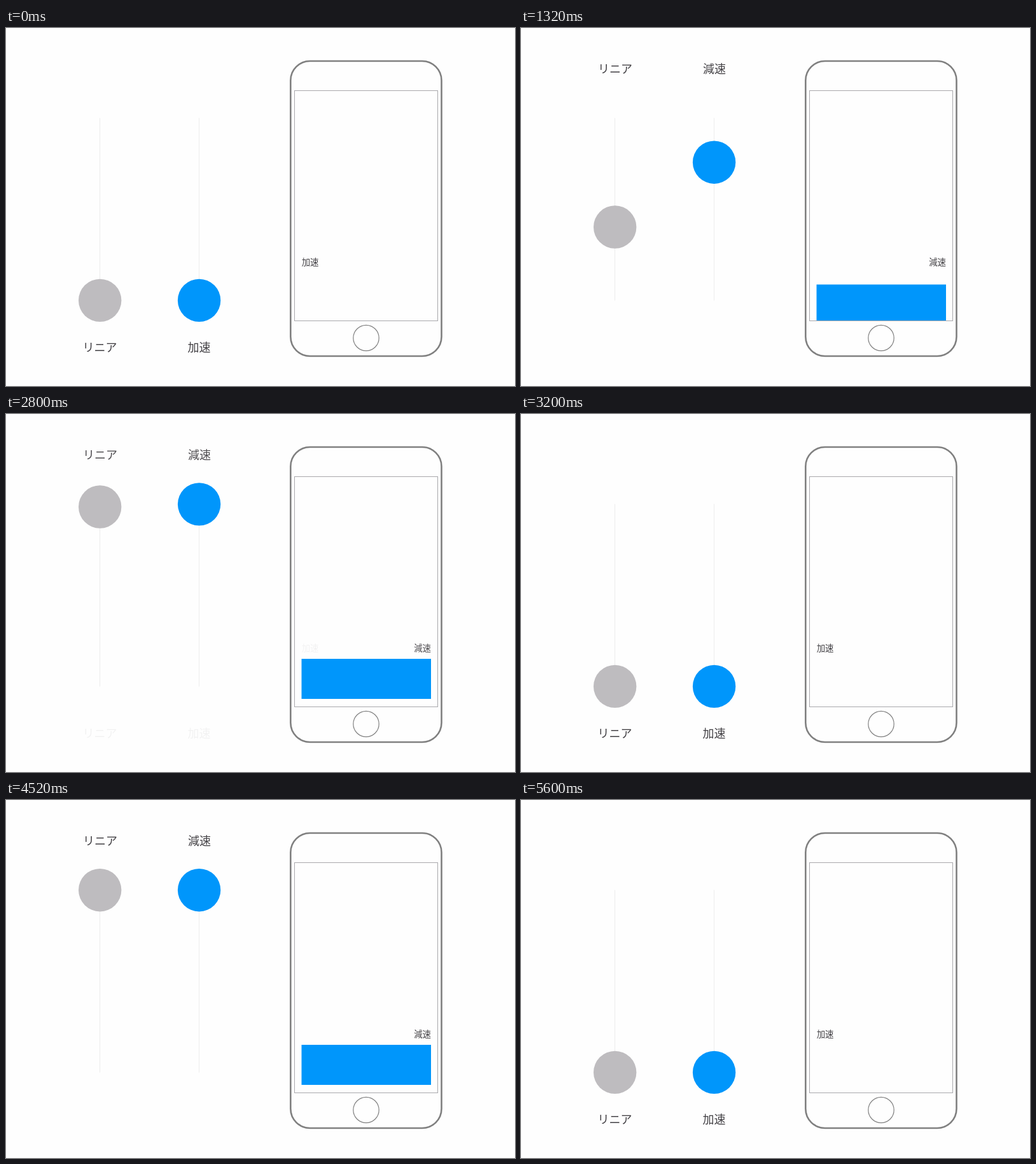
These frames come from a looping animation (800 px wide and 563 px high, 6040 ms). An HTML page:

```html
<!DOCTYPE html>
<html lang="ja">
<head>
<meta charset="utf-8">
<title>リニア・加速・減速</title>
<style>
  html, body { margin: 0; width: 100%; height: 100%; overflow: hidden; background: #fefefe; }
  svg { display: block; width: 100vw; height: 100vh; }
  text { font-family: "Noto Sans CJK JP", "Noto Sans CJK", "Noto Sans", sans-serif; fill: #434145; }
  .title { font-size: 18px; text-anchor: middle; }
  .caption { font-size: 13.4px; }
  .rail { stroke: #ececec; stroke-width: 1; }
</style>
</head>
<body>
<svg viewBox="0 0 800 563">
  <defs>
    <clipPath id="screen"><rect x="454" y="99" width="224" height="361"/></clipPath>
  </defs>

  <path class="rail" d="M147.5 141.5V428.5M303.5 141.5V428.5"/>
  <circle id="linearBall" cx="147.7" r="33.7" fill="#bebcbf"/>
  <circle id="easedBall" cx="303.6" r="33.7" fill="#0096fb"/>

  <g clip-path="url(#screen)">
    <rect id="card" x="464.5" width="203.5" height="63" fill="#0096fb"/>
  </g>
  <g fill="none" stroke="#808080">
    <rect x="447.3" y="52" width="237.2" height="464" rx="30.5" stroke-width="2.6"/>
    <rect x="453.5" y="98.5" width="225" height="362" stroke="#a9a8ac"/>
    <circle cx="566" cy="487.5" r="20.2" stroke-width="1.2"/>
  </g>

  <g id="upLabels">
    <text class="title" x="148" y="71.3">リニア</text>
    <text class="title" x="304" y="71.3">減速</text>
    <text class="caption" x="668" y="372.6" text-anchor="end">減速</text>
  </g>
  <g id="downLabels">
    <text class="title" x="147.6" y="509">リニア</text>
    <text class="title" x="303.6" y="509">加速</text>
    <text class="caption" x="464.7" y="372.6">加速</text>
  </g>
</svg>
<script>
  const LOOP = 6040;
  const FADE = 100;
  const BOTTOM = 428.4, TOP = 141.7;
  const CARD_SHOWN = 385, CARD_HIDDEN = 461;

  const moves = [
    { start: 1160, length: 400, up: true },
    { start: 2795, length: 400, up: false },
    { start: 4120, length: 400, up: true },
    { start: 5290, length: 310, up: false }
  ];

  const $ = id => document.getElementById(id);
  const clamp = v => Math.min(1, Math.max(0, v));
  const mix = (a, b, k) => a + (b - a) * k;

  function bezier(x1, y1, x2, y2) {
    const at = (a, b, s) => 3 * a * s * (1 - s) ** 2 + 3 * b * s * s * (1 - s) + s ** 3;
    return x => {
      if (x <= 0 || x >= 1) return clamp(x);
      let lo = 0, hi = 1;
      for (let i = 0; i < 24; i++) {
        const mid = (lo + hi) / 2;
        if (at(x1, x2, mid) < x) lo = mid; else hi = mid;
      }
      return at(y1, y2, lo);
    };
  }

  const accelerate = bezier(0.4, 0, 1, 1);
  const decelerate = bezier(0, 0, 0.2, 1);

  // Every value is a height: 0 at the bottom, 1 at the top.
  function stateAt(time) {
    const move = moves.filter(m => m.start <= time).pop();
    if (!move) return { linear: 0, eased: 0, label: 0 };
    const progress = clamp((time - move.start) / move.length);
    const eased = (move.up ? decelerate : accelerate)(progress);
    const fade = clamp((time - move.start) / FADE);
    const height = k => move.up ? k : 1 - k;
    return { linear: height(progress), eased: height(eased), label: height(fade) };
  }

  function draw(time) {
    const { linear, eased, label } = stateAt(time);
    $("linearBall").setAttribute("cy", mix(BOTTOM, TOP, linear));
    $("easedBall").setAttribute("cy", mix(BOTTOM, TOP, eased));
    $("card").setAttribute("y", mix(CARD_HIDDEN, CARD_SHOWN, eased));
    $("upLabels").setAttribute("opacity", label);
    $("downLabels").setAttribute("opacity", 1 - label);
  }

  const origin = performance.now();
  function tick() {
    draw((performance.now() - origin) % LOOP);
    requestAnimationFrame(tick);
  }
  draw(0);
  requestAnimationFrame(tick);
</script>
</body>
</html>
```
